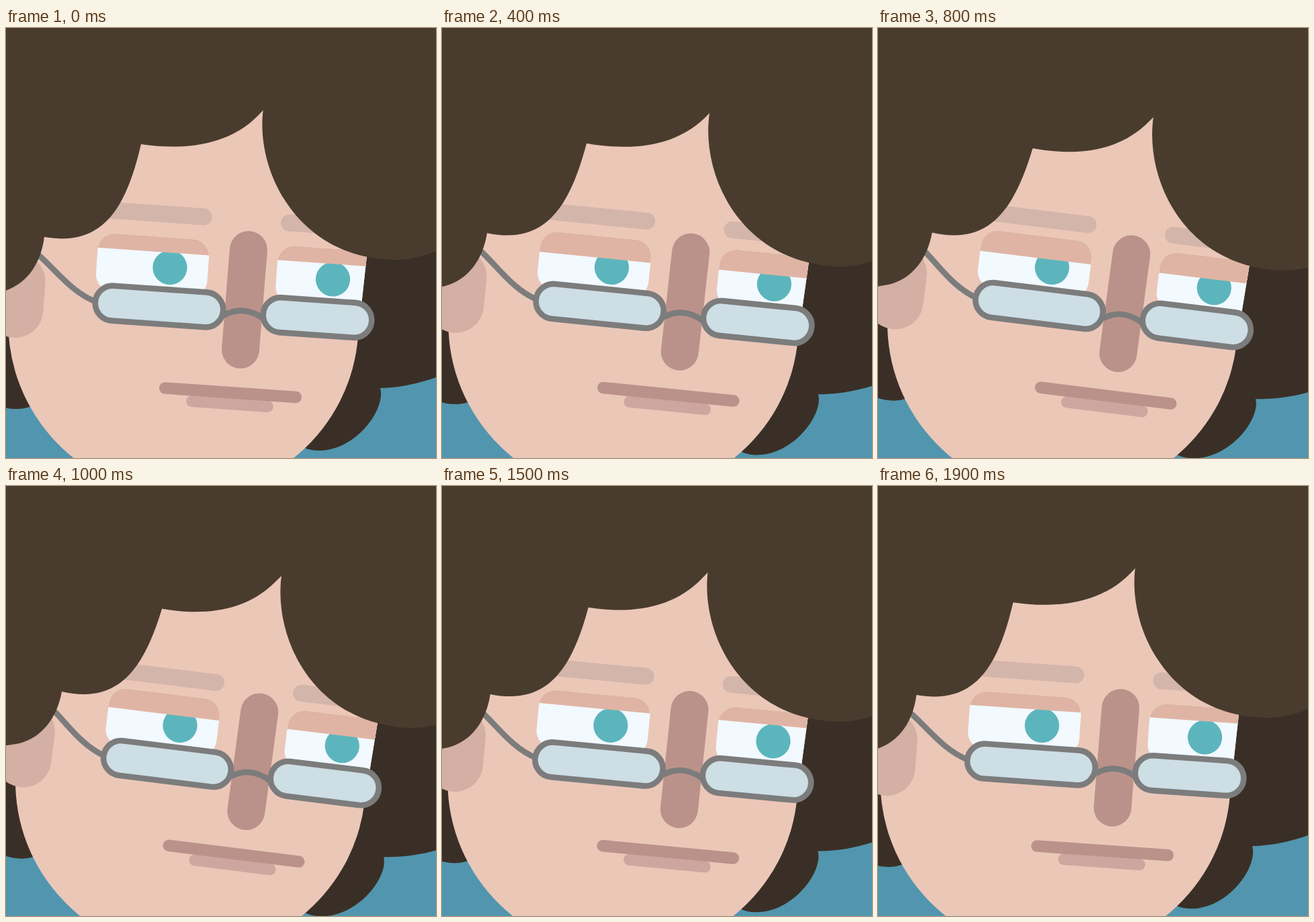
An HTML page for the animation above (2 s loop, 640 px wide and 640 px high).

```html
<!DOCTYPE html>
<html lang="en">
<head>
<meta charset="utf-8">
<title>Tilting head</title>
<style>
  html, body { margin: 0; width: 100%; height: 100%; overflow: hidden; background: #5196ae; }
  svg { display: block; width: 100%; height: 100%; }
</style>
</head>
<body>
<svg viewBox="0 0 640 640">
  <defs>
    <path id="faceShape" d="M20 190L4 422A260.5 257 4 0 0 524 458L545.5 262L560 100H100Z"/>
    <clipPath id="faceClip"><use href="#faceShape"/></clipPath>
    <clipPath id="eyeClip"><rect x="-83" y="-43" width="166" height="86" rx="25"/></clipPath>
  </defs>
  <rect width="640" height="640" fill="#5196ae"/>
  <g id="head">
    <g fill="#3a2f26">
      <path d="M500 250H740L720 480C680 505 625 534 557 536C566 566 522 629 466 629C450 629 440 624 430 615L400 500Z"/>
      <path d="M-80 480C-50 545-20 567 16 567C30 567 40 563 50 555L60 400Z"/>
    </g>
    <use href="#faceShape" fill="#ebc7b8"/>
    <g id="features"></g>
    <g clip-path="url(#faceClip)" id="eyes"></g>
    <g id="glasses" fill="none" stroke="#7c7c7c" stroke-width="8.6">
      <path d="M20 318C63 340 86 389 135 408"/>
      <path d="M324 428Q353 411 384 433"/>
    </g>
    <g fill="#493c2e">
      <path id="hairMid" d="M121 162.5L201 173C270 183 338 174 382 123L420 80V-90H120Z"/>
      <path id="hairLeft" d="M260-90L215 110L201 173C178 272 142 326 57 311C52 350 32 381-4 392L-90 410V-90Z"/>
      <path id="hairRight" d="M380-90L392 60L382.5 123C372 215 435 342 577 345C615 345 640 335 700 300L740-90Z"/>
    </g>
  </g>
</svg>
<script>
const LOOP = 2000, STEP = 100, TILT = 4;
const $ = id => document.getElementById(id);

function add(parent, tag, attrs) {
  const el = document.createElementNS(parent.namespaceURI, tag);
  for (const k in attrs) el.setAttribute(k, attrs[k]);
  return parent.appendChild(el);
}

// Rounded bar given by its centre
function bar(parent, cx, cy, w, h, r, attrs, angle = TILT) {
  return add(parent, 'rect', {
    x: cx - w / 2, y: cy - h / 2, width: w, height: h, rx: r,
    transform: `rotate(${angle} ${cx} ${cy})`, ...attrs
  });
}

function eye(cx, cy, irisX, irisY) {
  const g = add($('eyes'), 'g', {
    transform: `translate(${cx} ${cy}) rotate(${TILT})`, 'clip-path': 'url(#eyeClip)'
  });
  add(g, 'rect', { x: -84, y: -44, width: 168, height: 88, fill: '#f2f9ff' });
  add(g, 'circle', { cx: irisX, cy: irisY, r: 25.6, fill: '#5cb5bd' });
  return add(g, 'rect', { x: -84, y: -44, width: 168, fill: '#dfb4a4' });
}

const features = $('features');
bar(features, 15, 398, 84, 126, 42, { fill: '#d4afa3' });
const brows = add(features, 'g', { fill: '#d4b5aa' });
bar(brows, 216, 275.5, 182, 25, 12.5);
bar(brows, 494, 295, 170, 25, 12.5);
bar(features, 355, 404.5, 56, 205, 28, { fill: '#bb928a' }, 4.6);
bar(features, 333, 559.5, 130, 17, 8.5, { fill: '#cda79f' });
bar(features, 334, 542.7, 212.5, 17.5, 8.7, { fill: '#bb928a' });

const lids = [eye(218, 353, 26.2, 1.7), eye(485.5, 371.5, 1.2, 2.4)];
const lens = { fill: '#cddee5' };
bar($('glasses'), 228, 414.5, 190.8, 52, 26, lens);
bar($('glasses'), 463.5, 431, 161.8, 52, 26, lens);

function ease(a, b, t) {
  const u = Math.min(1, Math.max(0, (t - a) / (b - a)));
  return u * u * (3 - 2 * u);
}

// Rises over a..b, falls over c..d
const pulse = (t, a, b, c, d) => ease(a, b, t) - ease(c, d, t);

// t counts steps within the loop
function draw(t) {
  const tilt = pulse(t, .5, 6.9, 10.3, 19.3);
  const frown = pulse(t, .5, 6.9, 9.5, 16.6);
  const lag = pulse(t, 3.8, 10.5, 13, 19.5);
  const lid = 21.4 + 11.8 * pulse((t + 1.3) % 20, 0, 6.5, 9, 16.3);

  $('head').setAttribute('transform', `rotate(${3.04 * tilt} 253 640)`);
  brows.setAttribute('transform', `translate(0 ${9 * frown})`);
  $('hairLeft').setAttribute('transform', `translate(${8.7 * lag} ${4.5 * lag})`);
  $('hairMid').setAttribute('transform',
    `translate(${-10 * lag} ${10 * lag}) rotate(${1.5 * lag} 240 175)`);
  $('hairRight').setAttribute('transform', `translate(${lag} ${-3 * lag})`);
  for (const el of lids) el.setAttribute('height', lid + 1);
}

function frame() {
  draw(Math.floor(performance.now() % LOOP / STEP));
  requestAnimationFrame(frame);
}
frame();
</script>
</body>
</html>
```
